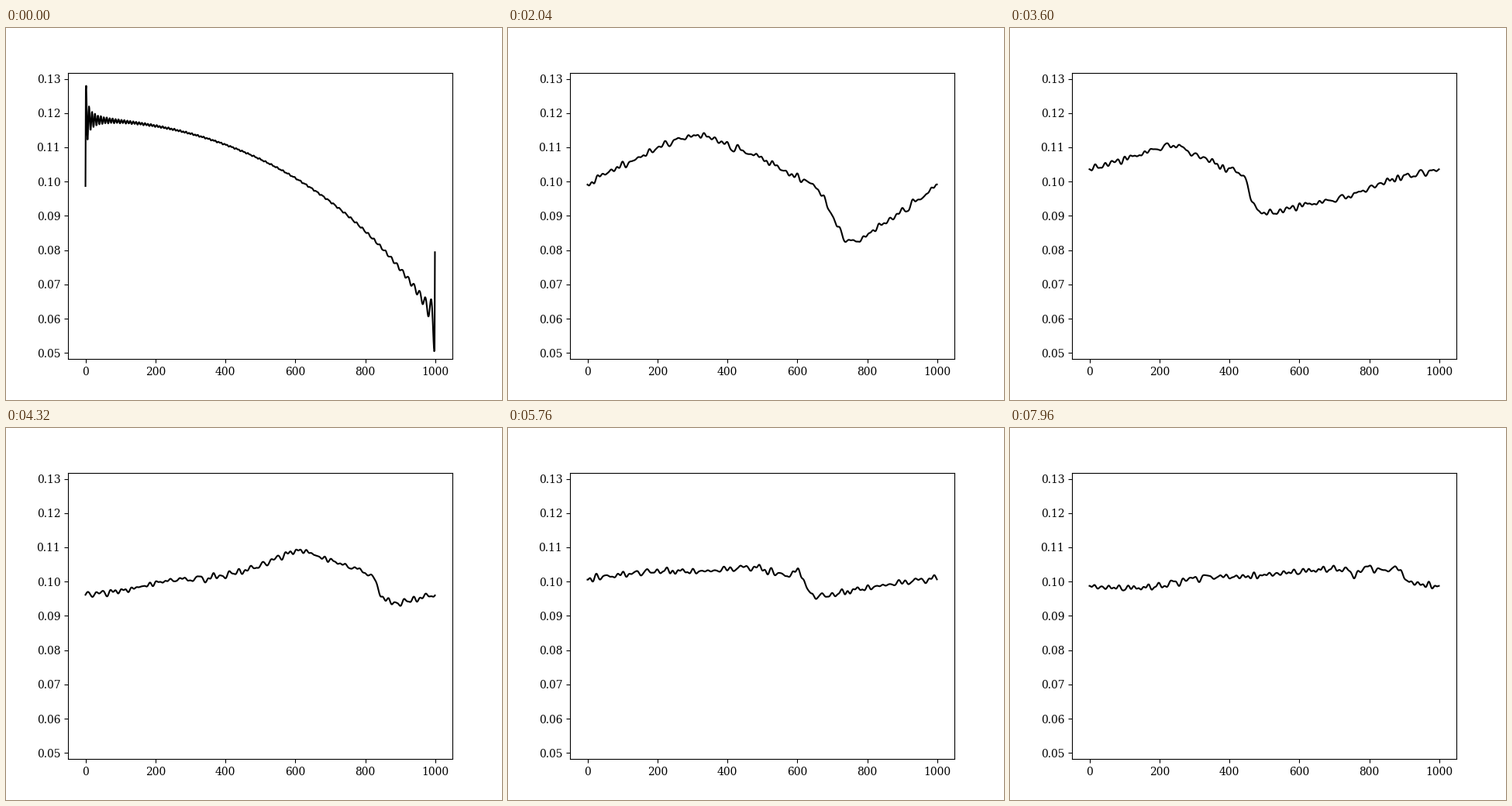
Animation, 640 px wide and 480 px high, one loop 8 s. Source, as a matplotlib script:

```python
import numpy as np
import matplotlib.pyplot as plt
from matplotlib.animation import FuncAnimation

FRAMES, INTERVAL = 200, 40
N = 1000
RISE, FALL = 6, 5           # stations from foot to peak, and from peak to next foot
SUB = 20                    # samples per station

plt.rcParams["font.family"] = "DejaVu Serif"
rng = np.random.default_rng(4)

# heights in 1e-4, from one foot to the next
HEIGHTS = [
    [768, 845, 945, 1022, 1070, 1125, 1148, 1115, 1070, 1010, 922],
    [886, 903, 938, 1008, 1055, 1100, 1122, 1088, 1070, 1035, 1025],
    [940, 960, 975, 1003, 1012, 1042, 1090, 1075, 1058, 1040, 1018],
    [960, 978, 1000, 1015, 1030, 1030, 1042, 1035, 1025, 1018, 1028],
    [960, 990, 995, 1025, 1025, 1040, 1035, 1008, 1036, 1000, 990],
    [998, 983, 985, 1012, 1015, 1028, 1037, 1022, 1043, 1030, 1040],
]
# when each shape is reached, and its unwrapped foot and peak on the ring
TIMES = [0, 29, 72, 108, 144, 165, 199]
FEET = [-2, 370, 1100, 1865, 2640, 3165, 3915]
PEAKS = [1, 750, 1880, 2610, 3470, 3985, 4720]

x = np.arange(N)
q = np.arange((RISE + FALL) * SUB + 1) / SUB


def start_shape():
    """Steep jump followed by a quarter of an ellipse."""
    def arc(s):
        return 0.118 * np.sqrt(1 - 0.74 * s ** 2)
    jump = arc(1) + (arc(0) - arc(1)) * q / RISE
    return np.where(q < RISE, jump, arc(np.clip((q - RISE) / FALL, 0, 1)))


def smooth_shape(heights):
    """Periodic Catmull-Rom curve through the stations."""
    h = np.array(heights) * 1e-4
    i = q.astype(int)
    t = q - i
    a, b, c, d = (h[(i + j) % len(h)] for j in (-1, 0, 1, 2))
    return b + 0.5 * t * (c - a + t * (2 * a - 5 * b + 4 * c - d
                                       + t * (3 * (b - c) + d - a)))


shapes = [start_shape()] + [smooth_shape(h) for h in HEIGHTS]

# fine ripples that drift along at slightly different speeds
waves = np.arange(18, 74, 2)
phases = rng.uniform(0, 2 * np.pi, len(waves))
speeds = rng.uniform(19, 23, len(waves))
sizes = rng.uniform(0.5, 1.0, len(waves)) / np.sqrt(waves)
sizes /= np.sqrt(np.sum(sizes ** 2) / 2)


def texture(n):
    arg = 2 * np.pi * waves * (x[:, None] - speeds * n) / N + phases
    level = 4.5e-4 * min(n / 50, 1)
    return level * (np.cos(arg) @ sizes)


def ringing(n, foot, peak):
    """Overshoot on both sides of the jump, soon fading."""
    after = (x - peak) % N
    before = (foot - x) % N
    high = np.cos(2 * np.pi * (after - 1) / 8.4) / (after + 4.5)
    low = np.cos(2 * np.pi * (before - 2) / 16.3) / (before + 4.2)
    return 0.055 * np.exp(-n / 5) * (high - low)


def profile(n):
    i = min(np.searchsorted(TIMES, n, side="right") - 1, len(TIMES) - 2)
    w = (n - TIMES[i]) / (TIMES[i + 1] - TIMES[i])
    foot = np.interp(n, TIMES, FEET)
    peak = np.interp(n, TIMES, PEAKS)
    pos = np.interp(q, [0, RISE, RISE + FALL], [foot, peak, foot + N])
    val = (1 - w) * shapes[i] + w * shapes[i + 1]
    base = np.interp(x, pos, val, period=N)
    return base + ringing(n, foot, peak) + texture(n)


fig, ax = plt.subplots(figsize=(6.4, 4.8), dpi=100)
line, = ax.plot(x, profile(0), color="black", lw=1.5)
ax.set_xlim(-49.95, 1048.95)
ax.set_ylim(0.0482, 0.1318)


def update(n):
    line.set_ydata(profile(n))
    return line,


anim = FuncAnimation(fig, update, frames=FRAMES, interval=INTERVAL,
                     repeat=True, repeat_delay=0)
plt.show()
```
